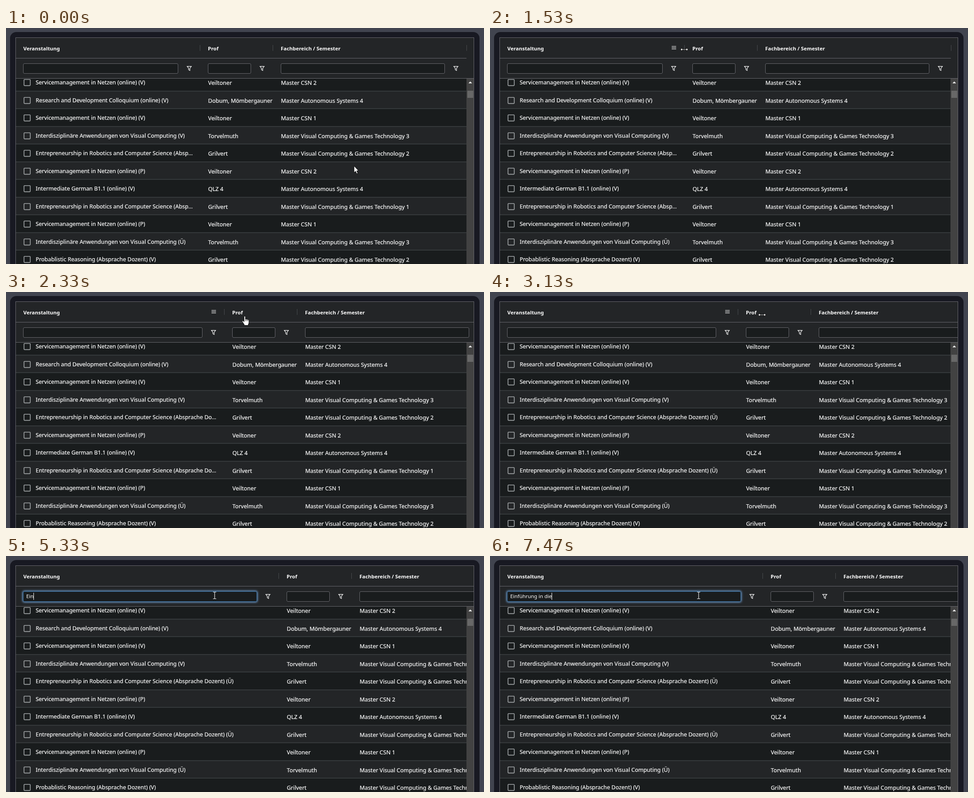
Write an HTML page that moves like this. It is 1063 px wide and 527 px high and loops after 8 s.

```html
<!DOCTYPE html>
<html lang="de">
<head>
<meta charset="utf-8">
<title>Veranstaltungen</title>
<style>
  html, body { margin: 0; width: 100%; height: 100%; overflow: hidden; background: #41444f; }
  #stage { --d: 0px; position: absolute; left: 0; top: 0; width: 1063px; height: 527px; overflow: hidden;
    color: #fff; font: 12.52px "Noto Sans", "Open Sans", sans-serif; }
  #stage div, #stage svg { position: absolute; box-sizing: border-box; white-space: pre; }
  .panel { left: 9px; top: 9px; width: 1044px; height: 560px; border-radius: 14px; background: #181922; }
  .grid { left: 21px; top: 21px; width: 1020px; height: 540px; border: 1px solid #68686e; background: #232527; }
  .layer { left: 0; top: 0; width: 1063px; height: 527px; }
  #head { clip-path: inset(22px 23px 0 22px); }
  #rows { clip-path: inset(113px 39px 0 22px); -webkit-text-stroke: .2px #fff; }
  .line { left: 22px; height: 1px; background: #68686e; }
  .title { top: 22.7px; line-height: 46px; font-size: 11.4px; font-weight: 700; }
  .divider { top: 38px; width: 1px; height: 13px; background: #484b4e; }
  .input { top: 79px; height: 23px; border: 1px solid #68686e; border-radius: 3px; background: #191c1d; }
  .input.focus { border-color: #2b5f8c; box-shadow: 0 0 4px 1.5px #719ece; }
  #typed { left: 45px; top: 82px; height: 16px; line-height: 16.8px; font-size: 11.4px; }
  #caret { left: 100%; top: 0; width: 1px; height: 16px; background: #fff; }
  .row { left: 22px; width: 1002px; height: 39.5px; border-bottom: 2px solid #35393b; background: #191c1d; }
  .row:nth-child(even) { background: #232527; }
  .row div { line-height: 39.5px; top: 1px; }
  .row .check { left: 17px; top: 12px; }
  .row .name { left: 44px; top: 0; width: calc(351px + var(--d)); overflow: hidden; text-overflow: ellipsis; font-size: 12.4px; }
  .track { left: 1024px; top: 113px; width: 16px; height: 414px; background: #424242; }
  .thumb { left: 1026px; top: 140px; width: 13px; height: 16px; background: #686868; }
  svg { overflow: visible; }
</style>
</head>
<body>
<div id="stage">
  <div class="panel"></div>
  <div class="grid"></div>
  <div class="layer" id="rows"></div>
  <div class="layer" id="head"></div>
  <div class="track"></div>
  <div class="thumb"></div>
  <svg style="left:1028px;top:119px" width="9" height="5"><path d="M0.5 4.5 4.5 0.5 8.5 4.5Z" fill="#fff"/></svg>
  <svg id="cursor" style="left:0;top:0" width="1" height="1">
    <g id="arrow"><path d="M0 0V15L3.4 11.8 6 17.4 8.4 16.3 5.9 10.9H10.2Z" fill="#fff" stroke="#000" stroke-width=".9"/></g>
    <g id="hand">
      <path d="M-1.6 1.2C-1.6-.5 1.4-.5 1.4 1.2V7C2 5.7 4 6 4.1 7.4 5 6.3 6.7 6.8 6.8 8.2 7.8 7.3 9.2 8 9.2 9.4V14C9.2 17 7.6 17.5 7.4 20.5H-.8C-1 17.5-3.5 15.8-5.3 12.3-6.2 10.2-4 9.4-2.9 10.8L-1.6 12.5Z" fill="#fff" stroke="#000" stroke-width=".9"/>
      <path d="M1.4 7V11M4.1 7.4V11M6.8 8.2V11" stroke="#000" stroke-width=".8"/>
    </g>
    <g id="resize"><path d="M-8.5 0-4.5-3.7V-.9H4.5V-3.7L8.5 0 4.5 3.7V.9H-4.5V3.7Z" fill="#fff" stroke="#000" stroke-width=".9"/></g>
    <g id="beam"><path d="M-3.5-7.5H-1L0-6.7 1-7.5H3.5M0-6.7V6.7M-3.5 7.5H-1L0 6.7 1 7.5H3.5" fill="none" stroke="#fff" stroke-width="1.1"/></g>
  </svg>
</div>
<script>
const LOOP = 8000;
const byId = id => document.getElementById(id);
const stage = byId('stage'), head = byId('head');

function add(parent, className, style = '', content = '') {
  const node = document.createElement('div');
  node.className = className;
  node.style.cssText = style;
  node.innerHTML = content;
  parent.append(node);
  return node;
}
const moved = x => `left:calc(${x}px + var(--d));`;

// Header: titles, dividers, filter boxes and icons
add(head, 'line', 'top:67px;width:calc(1002px + var(--d))');
add(head, 'line', 'top:112px;width:1018px');
add(head, 'title', 'left:38.5px', 'Veranstaltung');
add(head, 'title', moved(449), 'Prof');
add(head, 'title', moved(611), 'Fachbereich / Semester');
for (const x of [431, 593, 1024]) add(head, 'divider', moved(x));

const search = add(head, 'input', 'left:38px;width:calc(345px + var(--d))');
add(head, 'input', moved(448.5) + 'width:96px');
add(head, 'input', moved(610.5) + 'width:365px');
const funnel = '<svg width="11" height="11"><path d="M.8 .6H10.2L6.9 5V10L4.1 8.2V5Z" fill="none" stroke="#fff" stroke-width="1.2"/></svg>';
for (const x of [402, 564, 995]) add(head, '', moved(x) + 'top:85px', funnel);
const menu = add(head, '', moved(402.5) + 'top:40px',
  '<svg width="10" height="8"><path d="M0 1H10M0 4H10M0 7H10" stroke="#fff" stroke-width="1.1"/></svg>');

const typed = add(head, '');
typed.id = 'typed';
const typedText = document.createTextNode('');
typed.append(typedText);
const caret = add(typed, '');
caret.id = 'caret';

// Table body
const checkbox = '<svg width="16" height="16"><rect x="1.1" y="1" width="13.8" height="13.6" rx="1" fill="none" stroke="#a3a7a9" stroke-width="1.6"/></svg>';
const network = 'Servicemanagement in Netzen (online)';
const visual = 'Interdisziplinäre Anwendungen von Visual Computing';
const startup = 'Entrepreneurship in Robotics and Computer Science (Absprache Dozent) (Ü)';
const games = 'Master Visual Computing &amp; Games Technology ';
const autonomous = 'Master Autonomous Systems 4';
[
  [network + ' (V)', 'Veiltoner', 'Master CSN 2'],
  ['Research and Development Colloquium (online) (V)', 'Dobum, Mömbergauner', autonomous],
  [network + ' (V)', 'Veiltoner', 'Master CSN 1'],
  [visual + ' (V)', 'Torvelmuth', games + 3],
  [startup, 'Grilvert', games + 2],
  [network + ' (P)', 'Veiltoner', 'Master CSN 2'],
  ['Intermediate German B1.1 (online) (V)', 'QLZ 4', autonomous],
  [startup, 'Grilvert', games + 1],
  [network + ' (P)', 'Veiltoner', 'Master CSN 1'],
  [visual + ' (Ü)', 'Torvelmuth', games + 3],
  ['Probablistic Reasoning (Absprache Dozent) (V)', 'Grilvert', games + 2],
].forEach(([name, prof, field], i) => {
  const row = add(byId('rows'), 'row', `top:${102 + 39.5 * i}px`);
  add(row, 'check', '', checkbox);
  add(row, 'name', '', name);
  add(row, '', moved(427.5), prof);
  add(row, '', moved(589.5), field);
});

// Column shift: [time, pixels]
const shiftKeys = [[1330, 0], [1400, 1], [1530, 1], [1800, 27], [2200, 34], [2330, 54],
  [2530, 99], [2670, 99], [3130, 120], [3200, 175]];
// Pointer: [time, x, y, shape from then on]
const pointerKeys = [[0, 774, 308, 'arrow'], [70, 760, 298, 'arrow'], [400, 535, 140, 'arrow'],
  [600, 440, 65, 'hand'], [730, 427, 53, 'hand'], [1000, 427, 52, 'hand'], [1070, 432, 48, 'resize'],
  [1530, 432, 48, 'resize'], [1670, 452, 52, 'hand'], [1800, 470, 56, 'hand'], [2200, 466, 57, 'hand'],
  [2330, 531, 54, 'hand'], [2670, 531, 54, 'hand'], [2930, 574, 52, 'resize'], [3130, 605, 51, 'resize'],
  [3200, 606, 51, 'resize'], [3470, 606, 51, 'resize'], [3600, 590, 54, 'hand'], [3730, 560, 66, 'arrow'],
  [3870, 525, 79, 'beam'], [4130, 477, 81, 'beam'], [4270, 477, 81, 'beam'], [4400, 464, 88, 'beam']];
const phrase = 'Einführung in die';
const keyTimes = [5000, 5200, 5330, 5600, 5930, 6270, 6330, 6470,
  6670, 6770, 6870, 6970, 7070, 7170, 7270, 7370, 7470];

function sample(keys, t, column) {
  const next = keys.findIndex(key => key[0] > t);
  if (next < 0) return keys.at(-1)[column];
  if (next === 0) return keys[0][column];
  const a = keys[next - 1], b = keys[next];
  return a[column] + (b[column] - a[column]) * (t - a[0]) / (b[0] - a[0]);
}

function draw(now) {
  const tick = Math.floor((now % LOOP + 5) * 15 / 1000);
  const t = Math.round(tick * 100 / 15) * 10;

  stage.style.setProperty('--d', Math.round(sample(shiftKeys, t, 1)) + 'px');
  menu.style.display = t >= 600 && t < 3730 ? '' : 'none';

  const focused = t >= 4130;
  search.classList.toggle('focus', focused);
  typedText.data = phrase.slice(0, keyTimes.filter(time => time <= t).length);
  caret.style.display = focused && (t < 4670 || t >= 5000) ? '' : 'none';

  const shape = pointerKeys.findLast(key => key[0] <= t)[3];
  for (const id of ['arrow', 'hand', 'resize', 'beam']) byId(id).style.display = id === shape ? '' : 'none';
  byId('cursor').style.transform =
    `translate(${Math.round(sample(pointerKeys, t, 1))}px, ${Math.round(sample(pointerKeys, t, 2))}px)`;
}

const start = performance.now();
function frame() {
  draw(performance.now() - start);
  requestAnimationFrame(frame);
}
frame();
</script>
</body>
</html>
```
